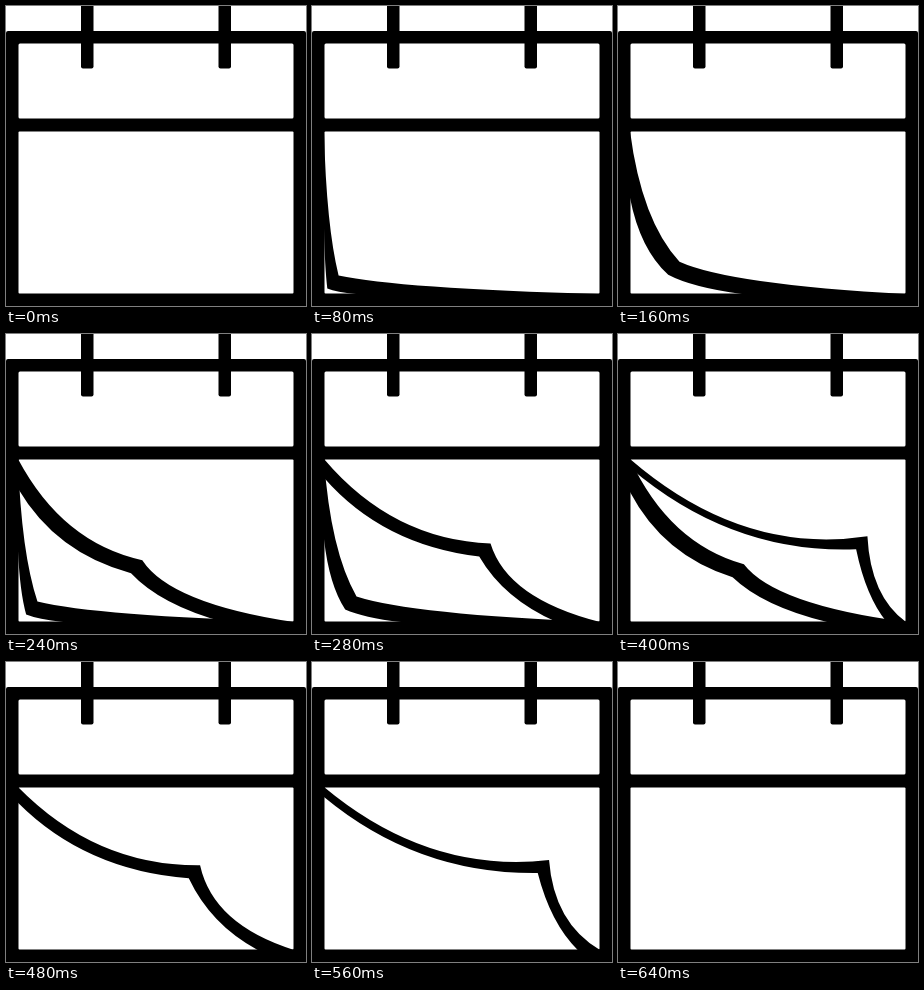
Write an HTML page that moves like this. It is 300 px wide and 300 px high and loops after 1.04 s.

```html
<!DOCTYPE html>
<html lang="en">
<head>
<meta charset="utf-8">
<title>Calendar</title>
<style>
  html, body { margin: 0; width: 100%; height: 100%; overflow: hidden; background: #fff; }
  svg { display: block; width: 100%; height: 100%; }
  .paper { fill: #fff; }
</style>
</head>
<body>
<svg viewBox="0 0 300 300">
  <path d="M2 25H298Q300 25 300 27V300H0V27Q0 25 2 25Z"/>
  <rect class="paper" x="12.5" y="37.5" width="275" height="75" rx="1.5"/>
  <rect class="paper" x="12.5" y="125.5" width="275" height="162" rx="1"/>
  <rect x="75" y="-4" width="12.5" height="66.5" rx="2"/>
  <rect x="212.5" y="-4" width="12.5" height="66.5" rx="2"/>
  <path class="sheet"/>
  <path class="sheet"/>
</svg>
<script>
const LOOP = 1040, STEP = 40;
const LEFT = 12, RIGHT = 288, TOP = 125, BOTTOM = 288;

// Each sheet is seen between from and to; its corner is halfway at mid
const turns = [
  { from: 40, to: 400, mid: 242, pace: 58 },
  { from: 200, to: 600, mid: 414, pace: 70 }
];

// Corner of the sheet sweeps right on an S-curve
const cornerX = (t, { mid, pace }) => LEFT + 253 / (1 + Math.exp((mid - t) / pace));

// It rises along a line and lifts more steeply at the end
const cornerY = x => 280 - 0.395 * x + 0.0085 * Math.max(0, x - 200) ** 2;

// Curve from a to b, its control point at the fractions fx, fy of the way
function curve([ax, ay], [bx, by], fx, fy) {
  return `Q${ax + (bx - ax) * fx} ${ay + (by - ay) * fy} ${bx} ${by}`;
}

function sheetPath(x) {
  const q = x / 250;
  const start = [LEFT, TOP], end = [RIGHT, BOTTOM];
  const tip = [x, cornerY(x)];
  const innerTip = [x - 11.3, tip[1] + 13];
  const innerStart = [LEFT, TOP + 130 * Math.exp(-x / 92)];
  const innerEnd = [RIGHT - 330 * Math.exp(-x / 88), BOTTOM];
  return `M${start}` +
    curve(start, tip, 0.1 + 0.6 * q - 0.23 * q * q, 0.65 + 0.6 * q * q) +
    curve(tip, end, 0.23 - 0.15 * q * q, 0.7) +
    `L${innerEnd}` +
    curve(innerEnd, innerTip, 0.68, 0.35) +
    curve(innerTip, innerStart, 0.8 - 0.25 * q, 0.36 - 0.42 * q * q) + 'Z';
}

const sheets = document.querySelectorAll('.sheet');

function draw() {
  const t = Math.floor(performance.now() % LOOP / STEP) * STEP;
  turns.forEach((turn, i) => {
    const seen = t >= turn.from && t <= turn.to;
    sheets[i].setAttribute('d', seen ? sheetPath(cornerX(t, turn)) : '');
  });
  requestAnimationFrame(draw);
}
draw();
</script>
</body>
</html>
```
